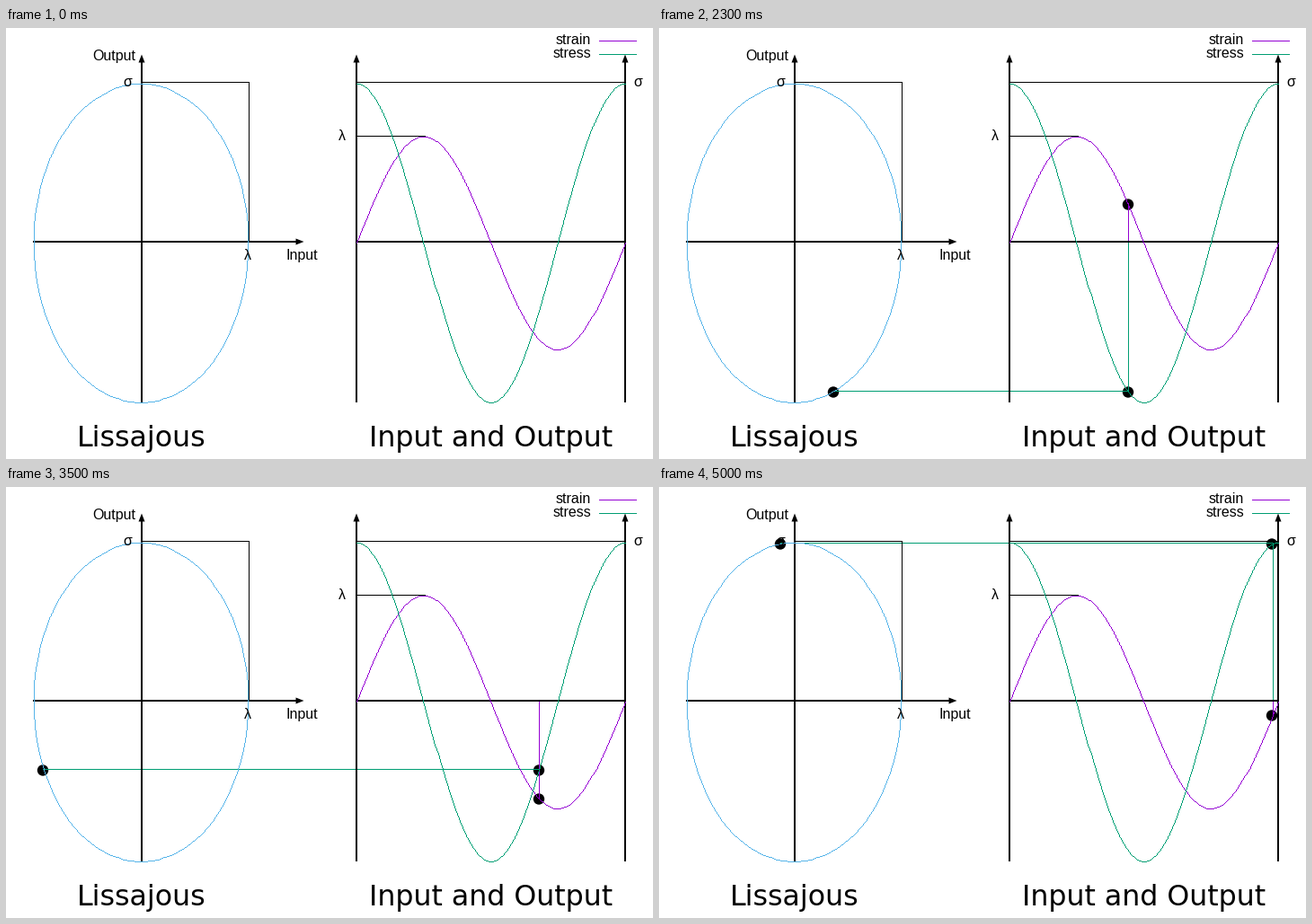
These frames come from a looping animation (720 by 480 pixels, 5.1 s). A matplotlib script:

```python
import numpy as np
import matplotlib.pyplot as plt
from matplotlib.animation import FuncAnimation
from matplotlib.colors import to_rgba
from matplotlib.patches import Circle

W, H, DPI = 720, 480, 100
PX = 72 / DPI  # points per pixel
FRAMES, STEPS = 51, 50
PURPLE, GREEN, BLUE = "#9400d3", "#009e73", "#56b4e9"
STRAIN, STRESS = 118.6, 178.0  # amplitudes in pixels

fig = plt.figure(figsize=(W / DPI, H / DPI), dpi=DPI, facecolor="white")
ax = fig.add_axes([0, 0, 1, 1])
ax.set_xlim(0, W)
ax.set_ylim(H, 0)
ax.axis("off")


def line(xs, ys, color="black", width=1, z=3):
    """Straight line; whole coordinates name the pixel row or column."""
    return ax.plot(xs, ys, color=color, lw=width * PX, zorder=z, snap=True,
                   antialiased=False, solid_capstyle="butt")[0]


def label(x, y, text, ha="left", size=16, font="Liberation Sans"):
    ax.text(x, y, text, ha=ha, va="baseline", fontsize=size * PX,
            family=font, color="black", zorder=5)


def head(x, y, dx, dy):
    """Narrow arrowhead with its tip at (x, y), pointing along (dx, dy)."""
    bx, by = x - 9 * dx, y - 9 * dy
    ax.fill([x, bx + 3.5 * dy, bx - 3.5 * dy],
            [y, by + 3.5 * dx, by - 3.5 * dx], color="black", lw=0, zorder=3)


def dot():
    return ax.add_patch(Circle((0, 0), 6.2, fc="black", lw=0, zorder=1))


def trace(canvas, xs, ys, color):
    """Paint a one-pixel polyline through whole-pixel vertices."""
    pts = np.rint(np.column_stack([xs, ys]))
    for p, q in zip(pts[:-1], pts[1:]):
        n = int(np.abs(q - p).max()) + 1
        col, row = np.rint(np.linspace(p, q, n)).astype(int).T
        canvas[row, col] = to_rgba(color)


# Axes
for x in (151, 390, 689):
    line([x, x], [417, 36], width=2)
    head(x, 29.5, 0, -1)
line([30, 326], [238, 238], width=2)
head(331.5, 238, 1, 0)
line([390, 689], [238, 238], width=2)

# Amplitude guides
line([151, 270], [60, 60])
line([270, 270], [60, 238])
line([390, 689], [60, 60])
line([390, 466], [120, 120])

# Curves
a = np.linspace(0, 2 * np.pi, 100)
time_x = np.linspace(390, 688.7, 100)
strain_y = 239.3 - STRAIN * np.sin(a)
stress_y = 239.3 - (STRESS - 0.5) * np.cos(a)
curves = np.zeros((H, W, 4))
trace(curves, time_x, strain_y, PURPLE)
trace(curves, time_x, stress_y, GREEN)
trace(curves, 150 + 119.5 * np.sin(a), stress_y, BLUE)
ax.imshow(curves, extent=(0, W, H, 0), interpolation="nearest",
          aspect="auto", zorder=4)

# Legend and labels
line([660, 701], [14, 14], PURPLE)
line([660, 701], [29, 29], GREEN)
label(651, 18, "strain", "right")
label(651, 33, "stress", "right")
label(144, 36, "Output", "right")
label(311.5, 258, "Input")
label(130, 65, "σ")
label(698, 65, "σ")
label(265, 258, "λ")
label(370, 125, "λ")
label(150.8, 466, "Lissajous", "center", 31.7, "DejaVu Sans")
label(540, 466, "Input and Output", "center", 31.7, "DejaVu Sans")

# Moving parts
dots = [dot() for _ in range(3)]
across = line([], [], GREEN, z=2)
drop_stress = line([], [], GREEN, z=2)
drop_strain = line([], [], PURPLE, z=2.1)
moving = dots + [across, drop_stress, drop_strain]


def update(i):
    for part in moving:
        part.set_visible(i > 0)
    t = max(i - 1, 0) / STEPS
    s = STRAIN * np.sin(2 * np.pi * t)
    c = STRESS * np.cos(2 * np.pi * t)
    left = round(149.8 + 120 * np.sin(2 * np.pi * t))
    right = round(390.4 + 298 * t)
    stress_row, strain_row = np.floor([240 - c, 240 - s]) + 0.5
    dots[0].center = left, stress_row
    dots[1].center = right, stress_row
    dots[2].center = right, strain_row
    col = round(390.1 + 298.8 * t)
    row = np.floor(239.1 - c)
    across.set_data([left, col], [row, row])
    drop_stress.set_data([col, col], [238, row])
    drop_strain.set_data([col, col], [238, np.floor(239.1 - s)])
    return moving


anim = FuncAnimation(fig, update, frames=FRAMES, interval=100, repeat=True,
                     repeat_delay=0, init_func=lambda: update(0), blit=False)
plt.show()
```
